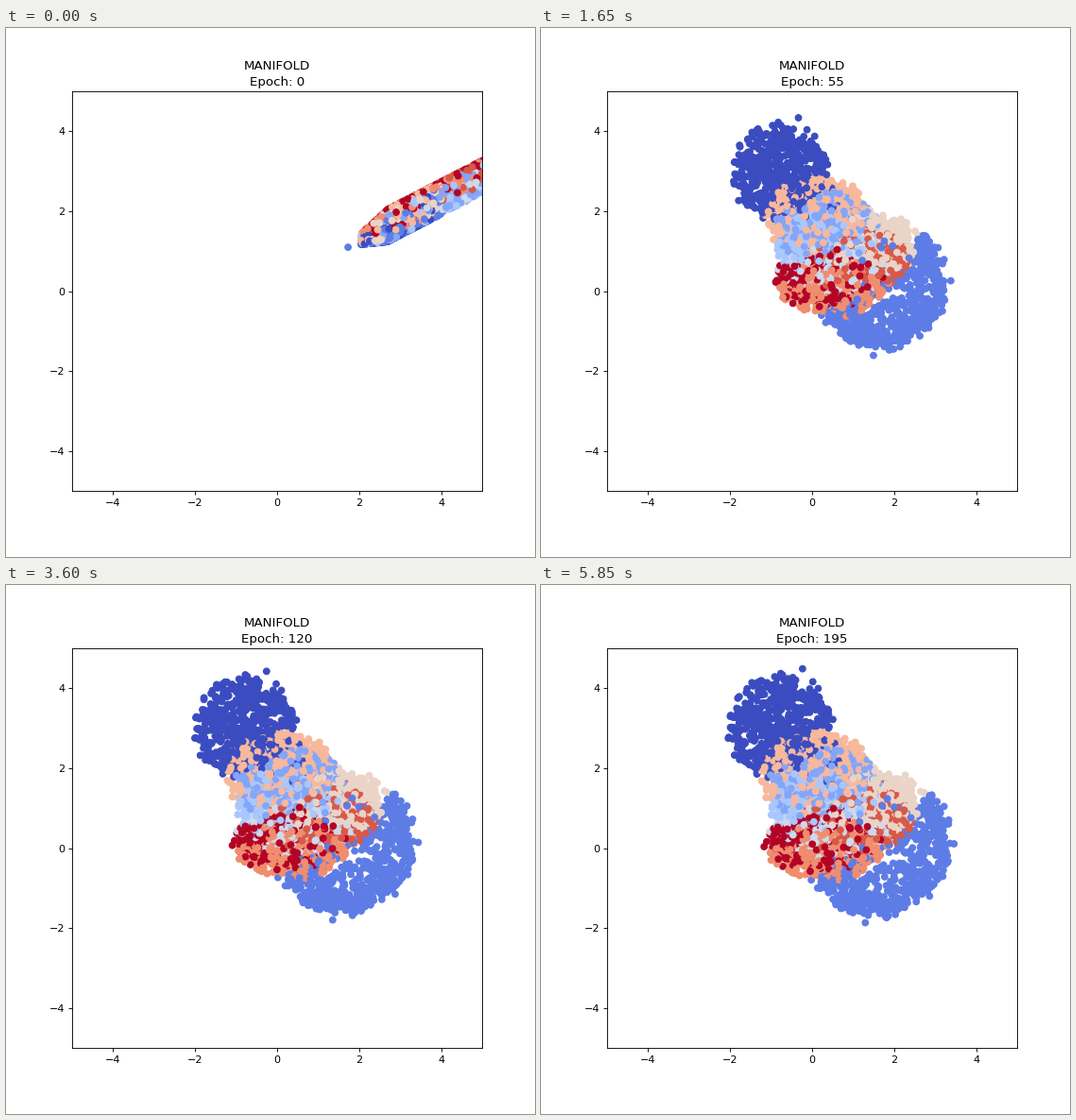
Recreate the animation shown at these times as a matplotlib script. Size 560 by 560 pixels, loop 6 s.

```python
import numpy as np
import matplotlib.pyplot as plt
from matplotlib.animation import FuncAnimation

FRAMES, INTERVAL, EPOCH_STEP = 40, 150, 5
PER_CLASS = 650
# Centre of each class cloud; class 1 is an arc around its centre.
CENTRES = [(-0.8, 2.95), (1.75, 0.2), (0.35, 1.6), (0.4, 1.3), (0.6, 0.7),
           (1.3, 1.2), (0.1, 1.95), (0.6, 0.2), (1.2, 0.9), (0.5, 0.4)]
ARC_CLASS = 1
HUB = np.array([1.0, 1.4])       # stray points lean towards here
ANCHOR = np.array([0.3, 2.0])    # fixed point of the slow stretch
STRETCH = np.array([[0.15, 0.15], [0, 0.15]])

rng = np.random.default_rng(12)


def polar(radius, angle):
    return np.column_stack([radius * np.cos(angle), radius * np.sin(angle)])


def cloud(k):
    """Points of one class after the first stage of training."""
    centre = np.array(CENTRES[k])
    u = rng.random(PER_CLASS)
    if k == ARC_CLASS:
        radius = 1.43 - 0.36 * np.abs(rng.normal(size=PER_CLASS))
        shape = polar(radius, np.radians(-155 + 210 * u))
    else:
        y = centre[1]
        axes = (1.2 - 0.04 * y, 0.5 + 0.2 * y)
        shape = polar(rng.random(PER_CLASS) ** 0.6, 2 * np.pi * u) * axes
    points = centre + shape + rng.normal(0, 0.07, shape.shape)
    lean = 0.8 * rng.random((PER_CLASS, 1)) ** 8
    return points + lean * (HUB - points)


def streak(k):
    """Points of one class before training: a slice of one long streak."""
    reach = 3.2 + 1.6 * np.sin(1.2 * (k - 1.7))
    along = reach * rng.beta(1.25, 1.25, PER_CLASS)
    side = 2 * rng.beta(1.6, 1.6, PER_CLASS) - 1 + 0.08 * (k - 4)
    half = np.minimum(0.4, 0.13 + 0.42 * along)
    y = 1.3 + 0.53 * along + np.clip(side, -1, 1) * half
    return np.column_stack([2.05 + along, y])


labels = np.repeat(np.arange(len(CENTRES)), PER_CLASS)
first = np.concatenate([streak(k) for k in range(len(CENTRES))])
early = np.concatenate([cloud(k) for k in range(len(CENTRES))])
first[PER_CLASS] = 1.73, 1.1     # lone point ahead of the streak

order = rng.permutation(len(labels))
first, early, labels = first[order], early[order], labels[order]
drift = (early - ANCHOR) @ STRETCH.T
rate = rng.uniform(0.05, 0.3, first.shape)
phase = rng.uniform(0, 2 * np.pi, first.shape)


def positions(epoch):
    since = epoch - 35
    settle = 1.25 * since / (abs(since) + 40)
    wobble = 0.1 * np.exp(-epoch / 60) * np.sin(rate * epoch + phase)
    trained = early + drift * settle + wobble
    return trained + (first - trained) * np.exp(-epoch / 2)


fig, ax = plt.subplots(figsize=(7, 7), dpi=80)
fig.subplots_adjust(left=0.125, right=0.9, bottom=0.125, top=0.88)
dots = ax.scatter(*first.T, c=labels, cmap="coolwarm")
ax.set(xlim=(-5, 5), ylim=(-5, 5),
       xticks=range(-4, 5, 2), yticks=range(-4, 5, 2))


def draw(i):
    epoch = i * EPOCH_STEP
    dots.set_offsets(positions(epoch))
    ax.set_title(f"MANIFOLD\nEpoch: {epoch}", linespacing=1.37)
    return [dots]


anim = FuncAnimation(fig, draw, frames=FRAMES, interval=INTERVAL,
                     repeat=True, repeat_delay=0)
plt.show()
```
